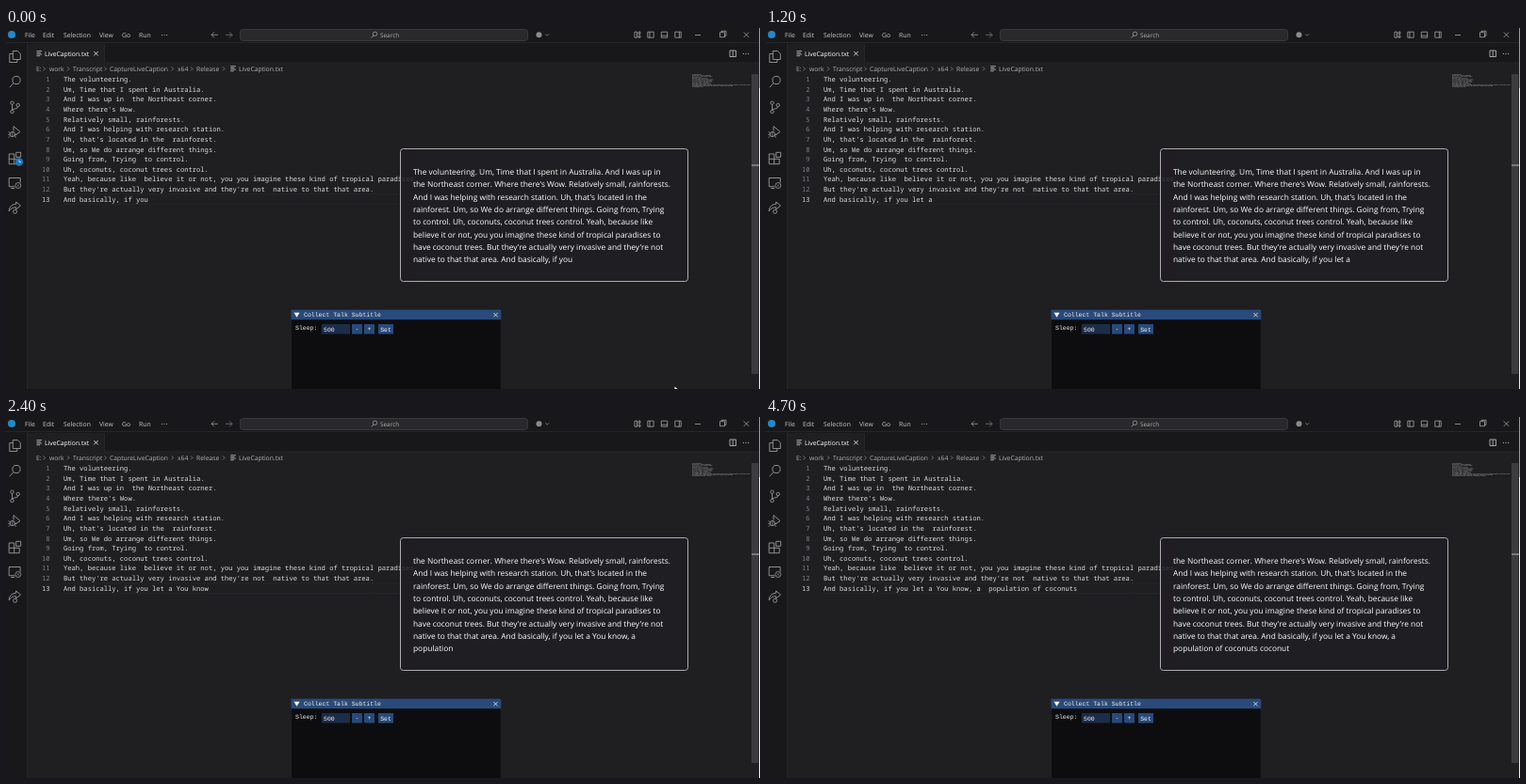
These frames come from a looping animation (800 by 384 pixels, 5000 ms). An HTML page with a canvas:

```html
<!DOCTYPE html>
<html lang="en">
<head>
<meta charset="utf-8">
<title>Caption transcript</title>
<style>
html, body { margin: 0; width: 100%; height: 100%; overflow: hidden; background: #1f1e20; }
canvas { display: block; width: 800px; height: 384px; }
</style>
</head>
<body>
<canvas id="stage" width="800" height="384"></canvas>
<script>
const ctx = document.getElementById('stage').getContext('2d');
const LOOP = 5000;
const SANS = '"Open Sans", "Noto Sans", sans-serif';
const MONO = '"Noto Sans Mono", "DejaVu Sans Mono", monospace';
const PIXEL = '"Liberation Mono", monospace';
const EDITOR = '#1f1e20', CHROME = '#18181a', EDGE = '#262628', ICON = '#8e8e92';

const lines = [
  'The volunteering.',
  'Um, Time that I spent in Australia.',
  'And I was up in  the Northeast corner.',
  "Where there's Wow.",
  'Relatively small, rainforests.',
  'And I was helping with research station.',
  "Uh, that's located in the  rainforest.",
  'Um, so We do arrange different things.',
  'Going from, Trying  to control.',
  'Uh, coconuts, coconut trees control.',
  'Yeah, because like  believe it or not, you you imagine these kind of tropical paradises to have coconut trees.',
  "But they're actually very invasive and they're not  native to that that area."
];
const captions = [
  'The volunteering. Um, Time that I spent in Australia. And I was up in',
  "the Northeast corner. Where there's Wow. Relatively small, rainforests.",
  "And I was helping with research station. Uh, that's located in the",
  'rainforest. Um, so We do arrange different things. Going from, Trying',
  'to control. Uh, coconuts, coconut trees control. Yeah, because like',
  'believe it or not, you you imagine these kind of tropical paradises to',
  "have coconut trees. But they're actually very invasive and they're not"
];
const AREA = 'native to that that area. And basically, if you';

// [start ms, text]: the file catches up with the captions about once a second
const fileSteps = [
  [0, ''], [1000, ' let a'], [2000, ' let a You know'],
  [3000, ' let a You know, a  population of'],
  [4000, ' let a You know, a  population of coconuts']
];
const liveSteps = [[0, ''], [300, ' let'], [800, ' let a'], [1900, ' let a You know']];
const tailSteps = [
  [2400, 'population'], [2800, 'population of'], [3500, 'population of coconut'],
  [3900, 'population of coconuts'], [4500, 'population of coconuts cocon'],
  [4700, 'population of coconuts coconut']
];

function at(steps, t) {
  let value = null;
  for (const [start, text] of steps) if (t >= start) value = text;
  return value;
}
function rect(x, y, w, h, color) {
  ctx.fillStyle = color;
  ctx.fillRect(x, y, w, h);
}
function text(s, x, y, size, color, family = SANS, align = 'left') {
  ctx.font = size + 'px ' + family;
  ctx.fillStyle = color;
  ctx.textAlign = align;
  ctx.fillText(s, x, y);
}
function path(d, color = ICON, width = 1, x = 0, y = 0) {
  ctx.save();
  ctx.translate(x, y);
  ctx.strokeStyle = color;
  ctx.lineWidth = width;
  ctx.stroke(new Path2D(d));
  ctx.restore();
}
function disc(x, y, r, color) {
  ctx.fillStyle = color;
  ctx.beginPath();
  ctx.arc(x, y, r, 0, Math.PI * 2);
  ctx.fill();
}
function ring(x, y, r, color = ICON, width = 1) {
  ctx.strokeStyle = color;
  ctx.lineWidth = width;
  ctx.beginPath();
  ctx.arc(x, y, r, 0, Math.PI * 2);
  ctx.stroke();
}
function cross(x, y, r, color, width = 0.8) {
  path(`M${-r} ${-r}L${r} ${r}M${r} ${-r}L${-r} ${r}`, color, width, x, y);
}
function dots(x, y, color) {
  for (const d of [-2.6, 0, 2.6]) disc(x + d, y, 0.6, color);
}
function fileIcon(x, y) {
  path('M-2.8 -2.6H2.8M-2.8 -.9H1.5M-2.8 .8H2.8M-2.8 2.5H.8', '#c0c0c3', 0.8, x, y);
}

function titleBar() {
  rect(0, 0, 800, 15, CHROME);
  rect(0, 15, 800, 1, EDGE);
  disc(6, 7, 4, '#2489ca');
  const menu = { File: 20, Edit: 39, Selection: 61, View: 99, Go: 123, Run: 141 };
  for (const name in menu) text(name, menu[name], 9.6, 6.85, '#c8c8c8');
  dots(168, 7.5, '#b0b0b0');
  path('M225 7.3H218M221 4.3L218 7.3L221 10.3', '#9a9a9a', 0.8);
  path('M233 7.3H240M237 4.3L240 7.3L237 10.3', '#77777a', 0.8);

  ctx.beginPath();
  ctx.roundRect(248.5, 1.5, 305, 12, 3);
  ctx.fillStyle = '#29292c';
  ctx.fill();
  ctx.strokeStyle = '#404044';
  ctx.lineWidth = 0.8;
  ctx.stroke();
  ring(391.5, 6.3, 2.2, '#b0b0b0', 0.7);
  path('M390 8L387.6 10.5', '#b0b0b0', 0.7);
  text('Search', 397, 9.7, 6.4, '#b0b0b0');

  disc(565.5, 7.2, 3, '#8c8c8e');
  path('M572.5 6.4L574.3 8.2L576.1 6.4', '#a0a0a0', 0.7);
  const pale = '#b8b8b8';
  path('M-3 -3H-.5V3H-3ZM1 -3H3V-.8H1ZM1 1H3V3H1Z', pale, 0.7, 670, 7.2);
  for (const x of [684, 698.5, 713]) path('M-3.2 -3H3.2V3H-3.2Z', pale, 0.7, x, 7.2);
  path('M683 4.2V10.2M695.3 8.2H701.7M714.4 4.2V10.2', pale, 0.7);
  path('M731 7.5H737', pale, 0.7);
  path('M757.5 4.7H762.5V9.7H757.5ZM759 4.5V3.3H764V8.3H762.6', pale, 0.7);
  cross(785.5, 7.2, 2.7, pale, 0.7);
}

function tabs() {
  rect(23, 16, 777, 21, CHROME);
  rect(23, 36.5, 777, 1, EDGE);
  rect(23, 17, 81, 21, EDITOR);
  rect(104, 17, 1, 20, EDGE);
  fileIcon(35.3, 27.2);
  text('LiveCaption.txt', 41, 29.8, 6.8, '#fff');
  cross(95.5, 27.2, 2.2, '#e4e4e4', 0.9);
  path('M768 24H774.5V30.5H768ZM771.2 24V30.5', '#c4c4c4', 0.8);
  dots(785, 27.3, '#c4c4c4');

  const crumbs = [['E:', 32], ['work', 46], ['Transcript', 71], ['CaptureLiveCaption', 110],
    ['x64', 182], ['Release', 202], ['LiveCaption.txt', 247]];
  for (const [name, x] of crumbs) text(name, x, 45.9, 6.75, '#b2b2b4');
  for (const x of [40.5, 66, 105.5, 176.5, 197, 231]) path('M-1 -2L1 0L-1 2', '#98989a', 0.7, x, 43.4);
  fileIcon(241, 43.3);
}

function activityBar(badge) {
  rect(0, 16, 22, 368, CHROME);
  rect(22, 16, 1, 368, EDGE);
  path('M-2 -6H3L6 -3V3H-2ZM-2 -3H-5.5V6H2.5V3', ICON, 1, 9.3, 30.5);
  ring(11, 55.5, 4.1);
  path('M8.1 58.4L3.8 63.2');
  ring(6.5, 79.7, 1.7);
  ring(6.5, 89, 1.7);
  ring(12.7, 82, 1.7);
  path('M6.5 81.5V87.3M12.7 83.7C12.7 86.5 8 85.4 6.8 87');
  path('M-1 -6L6 0L0 4M-1 -6V-1', ICON, 1, 9, 110.5);
  ring(6.8, 113, 2.6);
  path('M6.8 110.4V115.6M2.5 110.5L4.5 111.7M2 113.3H4.2M2.5 116.5L4.7 114.8M9.4 113.3H11.5M9 114.8L11 116.6', ICON, 0.8);
  path('M-6 -4.5H-.5V6.2H-6ZM-6 .8H5V6.2H-.5M1.5 -6.2H6.5V-1.2H1.5Z', ICON, 1, 9.2, 138.5);
  if (badge) {
    disc(14, 142.5, 4.2, '#1976bd');
    path('M14 140.2V142.7H16', '#e8e8e8', 0.8);
  }
  path('M0 4.2H-6V-5H6V0M-4 6H0', ICON, 1, 9.2, 164.5);
  ring(12.8, 167.5, 3, ICON, 0.9);
  path('M11.6 166.2L12.7 167.5L11.6 168.8M14.2 166.2L13.2 167.5L14.2 168.8', ICON, 0.6);
  path('M1.5 -6L6.3 -2L1.5 2V-.3C-2 -.3 -4.5 1 -6 4C-5.8 -.5 -3.5 -3.5 1.5 -3.7Z', ICON, 1, 9.2, 191);
  ring(9.6, 195.3, 2);
}

function editor(rows) {
  path('M61 176.9H724M61 187.4H724', '#29282b', 0.8);
  rows.forEach((row, i) => {
    const y = 57.2 + i * 10.625;
    text(String(i + 1), 46.5, y, 7.14, i === 12 ? '#d8d8d8' : '#7c8187', MONO, 'right');
    text(row, 61, y, 7.14, '#dedede', MONO);
    let col = 0;
    for (const word of row.split(' ')) {
      rect(728 + col * 0.56, 49.3 + i * 1.07, word.length * 0.56, 0.6, 'rgba(200,200,205,.5)');
      col += word.length + 1;
    }
  });
  rect(791, 49, 7.3, 319, '#3c3c3f');
  rect(791, 145.5, 8, 1, '#b5b5b8');
}

// Bright sliver of the desktop behind the editor window
function desktopEdge() {
  rect(799, 0, 1, 64, '#8fa388');
  rect(799, 64, 1, 320, '#f0f0f0');
}

function captionPanel(rows) {
  ctx.beginPath();
  ctx.roundRect(418.5, 128.5, 305, 141, 3);
  ctx.fillStyle = 'rgba(31,30,34,.85)';
  ctx.fill();
  // Only a sliver of the file shows through at the left
  ctx.save();
  ctx.clip();
  rect(436, 129, 288, 141, '#1f1e22');
  ctx.restore();
  ctx.strokeStyle = '#adadb0';
  ctx.lineWidth = 1;
  ctx.stroke();
  rows.forEach((row, i) => text(row, 432, 155.9 + i * 13.37, 8.35, '#fff'));
}

function toolWindow() {
  rect(302.3, 299.5, 223.2, 84.5, '#0d0d10');
  path('M302.6 384V299.8H525.2V384', '#2d2d35', 0.6);
  rect(302.5, 299.7, 222.8, 10.5, '#294a7a');
  ctx.fillStyle = '#fff';
  ctx.fill(new Path2D('M305.5 302.8H311.5L308.5 307.8Z'));
  text('Collect Talk Subtitle', 316, 307.4, 6.5, '#f2f2f2', PIXEL);
  cross(519.5, 305.2, 2.1, '#f2f2f2');
  text('Sleep:', 307, 321.3, 6.5, '#f2f2f2', PIXEL);
  rect(335, 315, 30, 10.5, '#1c2d49');
  for (const [x, w] of [[367, 11], [380, 11], [395, 16]]) rect(x, 315, w, 10.5, '#284a7a');
  text('500', 337, 322.5, 6.5, '#f2f2f2', PIXEL);
  text('-', 372.5, 322.3, 6.5, '#f2f2f2', PIXEL, 'center');
  text('+', 385.5, 322.3, 6.5, '#f2f2f2', PIXEL, 'center');
  text('Set', 403, 322.5, 6.5, '#f2f2f2', PIXEL, 'center');
}

function pointer() {
  ctx.fillStyle = '#fff';
  ctx.fill(new Path2D('M709.5 381.5L712.5 384H709.5Z'));
}

function draw(t) {
  ctx.textRendering = 'geometricPrecision';
  rect(0, 0, 800, 384, EDITOR);
  const early = t < 300;
  const tail = at(tailSteps, t);
  const live = tail === null
    ? [...captions, AREA + at(liveSteps, t)]
    : [...captions.slice(1), AREA + ' let a You know, a', tail];
  titleBar();
  tabs();
  activityBar(early);
  editor([...lines, 'And basically, if you' + at(fileSteps, t)]);
  desktopEdge();
  captionPanel(live);
  toolWindow();
  if (early) pointer();
}

const start = performance.now();
function tick() {
  draw((performance.now() - start) % LOOP);
  requestAnimationFrame(tick);
}
tick();
</script>
</body>
</html>
```
